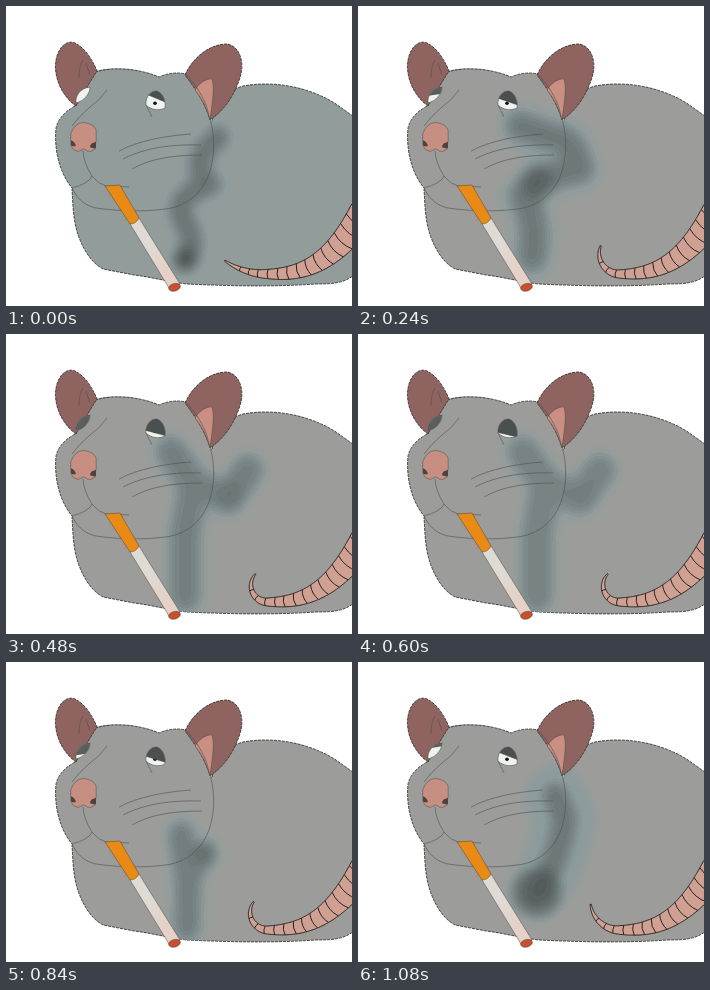
These frames come from a looping animation (346x300 px, 1200 ms). An HTML page:

```html
<!DOCTYPE html>
<html lang="en">
<head>
<meta charset="utf-8">
<title>Smoking rat</title>
<style>
  html, body { margin: 0; width: 100%; height: 100%; overflow: hidden; background: #fff; }
  svg { display: block; width: 100vw; height: 100vh; }
  .line { fill: none; stroke: #4c5150; stroke-width: .6; }
  .edge { stroke: #252827; stroke-width: .8; stroke-dasharray: 3 1; }
  .thin { stroke: #4a4644; stroke-width: .5; }
  .ink { stroke: #222; stroke-width: 1; }
  .puff { fill: none; stroke-linecap: round; stroke-linejoin: round; }
</style>
</head>
<body>
<svg viewBox="0 0 346 300">
  <defs>
    <filter id="haze" filterUnits="userSpaceOnUse" x="100" y="70" width="200" height="230" color-interpolation-filters="sRGB">
      <feGaussianBlur stdDeviation="6"/>
      <feComponentTransfer>
        <feFuncA type="discrete" tableValues="0 .07 .14 .21 .28 .35 .42 .49 .56 .63 .7 .77 .84 .91 1"/>
      </feComponentTransfer>
    </filter>
    <linearGradient id="paper" gradientUnits="userSpaceOnUse" x1="128" y1="215" x2="168" y2="280">
      <stop offset=".4" stop-color="#dfdad3"/>
      <stop offset=".8" stop-color="#e5d1c5"/>
    </linearGradient>
    <path id="eye" d="M140 99C139 91 145 84 151 85C157 87 160 95 159 102C153 105 145 104 140 99Z"/>
    <path id="farEye" d="M70 97C69 90 74 82 84 81C84 88 78 95 70 97Z"/>
    <path id="back" d="M206 115C210 100 219 85 237 80C270 74 305 82 330 98L348 111V269C338 277 328 278 310 278C266 281 224 280 181 278C162 276 146 271 128 269L97 263C86 257 79 246 74 234C67 217 67 200 66 183Z"/>
    <path id="head" d="M66 182C53 166 48 143 50 122Q53 109 69 100C73 88 82 78 90 65C109 60 134 63 153 71Q167 65 180 68C189 79 199 90 203 110C208 124 210 145 204 165C197 187 180 201 159 203C137 206 111 205 90 202C76 199 70 190 66 182Z"/>
    <clipPath id="eyeShape"><use href="#eye"/></clipPath>
    <clipPath id="farEyeShape"><use href="#farEye"/></clipPath>
    <clipPath id="skinShape"><use href="#back"/><use href="#head"/></clipPath>
  </defs>

  <g id="skin">
    <use href="#back" class="edge"/>
    <use href="#head"/>
  </g>
  <path class="line edge" d="M89 66C109 60 134 63 153 71Q167 65 180 68M69 100Q53 109 50 122C48 143 53 166 66 182"/>

  <g clip-path="url(#skinShape)">
    <g filter="url(#haze)"><path id="halo" class="puff" stroke="#8c9b9c"/></g>
    <g filter="url(#haze)" stroke="#434848">
      <path id="trail" class="puff"/>
      <path id="core" class="puff"/>
    </g>
  </g>

  <path class="edge" fill="#8f6460" d="M70 100C57 91 47 72 50 54C53 39 62 34 69 37C79 42 86 53 91 65Q82 79 70 100Z"/>
  <path class="line" d="M73 72Q73 60 77 54M84 69L80 57"/>
  <path class="edge" fill="#8f6460" d="M179 69C187 51 204 38 221 38C233 40 238 54 235 68C230 87 219 104 204 114Q199 95 179 69Z"/>
  <path class="thin" fill="#c88f82" d="M189 84C194 76 202 72 206 73C209 83 206 98 204 114Q199 96 189 84Z"/>

  <g class="line">
    <path d="M180 68C189 79 199 90 203 110C208 124 210 145 204 165C197 187 180 201 159 203C137 206 111 205 90 202C76 199 70 190 66 182"/>
    <path d="M101 84Q93 95 84 101Q73 110 66 120"/>
    <path d="M77 145Q78 158 86 170Q82 178 66 182M86 170Q92 178 100 180L123 181"/>
    <path d="M113 145C132 135 157 130 185 128M117 153C138 142 165 138 195 139M126 163C143 153 166 149 196 149"/>
    <path d="M140 99L146 111"/>
  </g>

  <g clip-path="url(#farEyeShape)">
    <rect x="65" y="76" width="24" height="26" fill="#f0f2ee"/>
    <path id="farLid" fill="#5a5f5e"/>
  </g>
  <use href="#farEye" class="line"/>
  <g clip-path="url(#eyeShape)">
    <rect x="135" y="80" width="30" height="30" fill="#eff2ee"/>
    <circle cx="149" cy="97.3" r="1.8" fill="#111"/>
    <path id="lid" class="thin" fill="#4a504f"/>
  </g>
  <use href="#eye" class="line"/>

  <path class="thin" fill="#c68f82" d="M65 127Q69 117 77 116.5Q86 117 90 123Q91 133 89 143Q85 147 81 145Q78 141 74 145Q68 146 65 140Q64 133 65 127Z"/>
  <path fill="#4b4240" d="M65 134Q69 136 70 140Q66 141 65 139ZM90 136Q84 137 84 141Q87 143 90 142Z"/>

  <path class="thin" fill="url(#paper)" d="M124 218L133 212L174 278L163 282Z"/>
  <path class="thin" fill="#e88a13" d="M99 180L114 179L133 212Q130 218 124 218Z"/>
  <ellipse class="thin" cx="168.5" cy="281.3" rx="6" ry="3.8" fill="#c9502f" transform="rotate(-15 168.5 281.3)"/>

  <path id="tail" class="ink" fill="#d0a092"/>
  <path id="rings" class="ink" fill="none"/>
</svg>
<script>
const STEP = 120, STEPS = 10, LAST_POSE = STEPS / 2;

// Each plume: a drifting trail and the denser core it feeds
const plumes = [
  { trail: "M179 255Q192 238 178 215T204 178Q180 158 212 131", width: 21, core: "M179 253h0", size: 22 },
  { trail: "M179 230Q200 200 207 157L197 133", width: 24, core: "M179 230h0", size: 48 },
  { trail: "M174 251Q180 215 165 190L180 172L222 163Q215 135 200 133L162 120", width: 27, core: "M180 178h0", size: 32 },
  { trail: "M181 266L182 222L175 172M182 215L198 191", width: 23, core: "M198 191h0", size: 20 },
  { trail: "M179 262V200L188 150L165 118M188 150L222 165L242 136", width: 28, core: "M224 160h0", size: 26 }
];

const easeOut = t => 1 - (1 - t) ** 3;
const xy = p => p.map(v => v.toFixed(2)).join(" ");

function set(id, attributes) {
  const node = document.getElementById(id);
  for (const [name, value] of Object.entries(attributes)) node.setAttribute(name, value);
}

const base = [262, 268];

// The tip bends upwards from the base with a constant curvature
function tailTip(curl, steps = 60) {
  const turn = (35 + 100 * curl) * Math.PI / 180, stride = (46 - 7 * curl) / steps;
  const points = [];
  let [x, y] = base;
  for (let i = 0; i < steps; i++) {
    const angle = turn * i / steps;
    points.unshift([x -= stride * Math.cos(angle), y -= stride * Math.sin(angle)]);
  }
  return points;
}

function tailRoot(steps = 120) {
  const curve = [base, [300, 269], [328, 255], [360, 204]];
  return Array.from({ length: steps }, (_, i) => {
    const t = i / steps, s = 1 - t;
    const weights = [s ** 3, 3 * s * s * t, 3 * s * t * t, t ** 3];
    return [0, 1].map(axis => curve.reduce((sum, p, k) => sum + p[axis] * weights[k], 0));
  });
}

function drawTail(progress) {
  const mid = [...tailTip(easeOut(progress)), ...tailRoot()];
  const upper = [], lower = [];
  let rings = "", length = 0, nextRing = 17;
  for (let i = 0; i < mid.length - 1; i++) {
    const [x, y] = mid[i];
    const dx = mid[i + 1][0] - x, dy = mid[i + 1][1] - y, d = Math.hypot(dx, dy);
    const half = .6 + length * .088;
    const side = s => [x + s * half * dy / d, y - s * half * dx / d];
    upper.push(side(1));
    lower.push(side(-1));
    if (length >= nextRing) {
      const bulge = [x - dx / d * half * .4, y - dy / d * half * .4];
      rings += `M${xy(side(1))}Q${xy(bulge)} ${xy(side(-1))}`;
      nextRing += 9 + length * .02;
    }
    length += d;
  }
  set("tail", { d: "M" + [...upper, ...lower.reverse()].map(xy).join("L") + "Z" });
  set("rings", { d: rings });
}

function drawSmoke(pose) {
  const { trail, width, core, size } = plumes[Math.min(pose, plumes.length - 1)];
  set("halo", { d: trail + core, "stroke-width": Math.max(width, size) + 14 });
  set("trail", { d: trail, "stroke-width": width, opacity: .48 - pose * .03 });
  set("core", { d: core, "stroke-width": size, opacity: .7 - pose * .13 });
}

function drawEyes(pose) {
  const left = 88 + pose * 2.1, right = 96 + pose * 1.4, far = 82 + pose * 3.4;
  set("lid", { d: `M135 78H165V${right + 1}L159 ${right}L140 ${left}H135Z` });
  set("farLid", { d: `M64 74H90V${far - 2}L64 ${far + 2}Z` });
}

let shown = -1;
function render(time) {
  const step = Math.floor(time / STEP) % STEPS;
  if (step === shown) return;
  shown = step;
  const pose = Math.min(step, STEPS - step);
  const cool = step % 3 === 0 && step < STEPS - 1;
  set("skin", { fill: cool ? "#929c9b" : "#9c9d9a" });
  drawSmoke(pose);
  drawEyes(pose);
  drawTail(pose / LAST_POSE);
}

const start = performance.now();
function tick() {
  render(performance.now() - start);
  requestAnimationFrame(tick);
}
tick();
</script>
</body>
</html>
```
